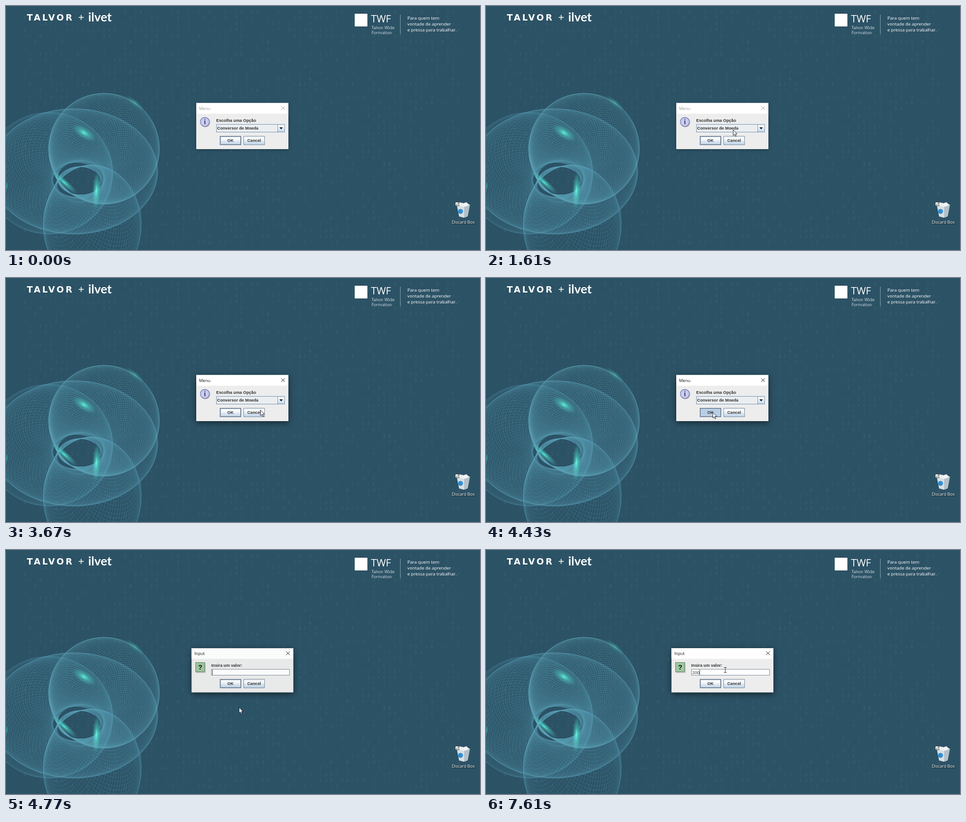
These frames come from a looping animation (1044x537 px, 8000 ms). An HTML page with a canvas:

```html
<!DOCTYPE html>
<html lang="pt">
<head>
<meta charset="utf-8">
<title>Conversor</title>
<style>
html, body { margin: 0; width: 100%; height: 100%; overflow: hidden; background: #2c5265; }
canvas { display: block; }
</style>
</head>
<body>
<canvas id="stage" width="1044" height="537"></canvas>
<script>
const W = 1044, H = 537, LOOP = 8000, TAU = Math.PI * 2;
const SWING = 'bold 9.2px "Liberation Sans", Arial, sans-serif';
const UI = '"Open Sans", "Noto Sans", sans-serif';
const stage = document.getElementById('stage').getContext('2d');

function layer() {
  const c = document.createElement('canvas');
  c.width = W;
  c.height = H;
  return c.getContext('2d');
}

function text(g, s, x, y, font, color, align = 'left') {
  g.font = font;
  g.fillStyle = color;
  g.textAlign = align;
  g.fillText(s, x, y);
}

function box(g, x, y, w, h, fill, line) {
  g.fillStyle = fill;
  g.fillRect(x, y, w, h);
  if (!line) return;
  g.strokeStyle = line;
  g.lineWidth = 1;
  g.strokeRect(x + .5, y + .5, w - 1, h - 1);
}

function poly(g, points, fill, line, width = 1) {
  g.beginPath();
  points.forEach(([x, y]) => g.lineTo(x, y));
  if (fill) { g.closePath(); g.fillStyle = fill; g.fill(); }
  if (line) { g.strokeStyle = line; g.lineWidth = width; g.stroke(); }
}

function disc(g, x, y, r, fill) {
  g.beginPath();
  g.arc(x, y, r, 0, TAU);
  g.fillStyle = fill;
  g.fill();
}

// ---- desktop, drawn once ----

function digits(g) {
  let seed = 71;
  const rnd = () => (seed = (seed * 16807) % 2147483647) / 2147483647;
  for (let row = 0; row < 39; row++) {
    for (let col = 0; col < 83; col++) {
      const shade = .06 + .14 * rnd(), n = Math.floor(rnd() * 9) + 1;
      if (rnd() < .46)
        text(g, n, 41 + col * 11.65, 16.5 + row * 13.37, '10px ' + UI, `rgba(125,175,190,${shade})`, 'center');
    }
  }
}

// A band of closed lines that wind between an outer ellipse and the central hole.
function ribbon(g, outer, lines, alpha) {
  const hole = [160, 384, 45, 30], steps = 200;
  g.strokeStyle = `rgba(92,160,181,${alpha})`;
  g.lineWidth = .7;
  for (let k = 0; k < lines; k++) {
    g.beginPath();
    for (let i = 0; i <= steps; i++) {
      const t = i / steps * TAU;
      const s = .46 * (1 - Math.cos(k / lines * TAU + t));
      const [cx, cy, rx, ry] = outer.map((v, j) => v + (hole[j] - v) * s);
      g.lineTo(cx + rx * Math.cos(t), cy + ry * Math.sin(t));
    }
    g.stroke();
  }
}

function knot(g) {
  ribbon(g, [150, 364, 184, 138], 80, .42);
  ribbon(g, [216, 314, 122, 122], 80, .5);
  ribbon(g, [190, 482, 108, 132], 50, .42);
  ribbon(g, [95, 368, 140, 134], 50, .34);
}

function glow(g, x, y, rx, ry, angle, alpha) {
  g.save();
  g.translate(x, y);
  g.rotate(angle);
  g.scale(rx, ry);
  const grad = g.createRadialGradient(0, 0, 0, 0, 0, 1);
  grad.addColorStop(0, `rgba(100,255,228,${alpha})`);
  grad.addColorStop(.4, `rgba(80,230,210,${alpha * .5})`);
  grad.addColorStop(1, 'rgba(80,220,205,0)');
  disc(g, 0, 0, 1, grad);
  g.restore();
}

function bin(g) {
  poly(g, [[993, 438], [1022, 437], [1017, 463], [1009, 466], [998, 463]], '#b4c0c8');
  poly(g, [[993, 438], [1009, 442], [1009, 466], [998, 463]], '#d8e0e5');
  poly(g, [[994, 438], [999, 432], [1007, 434], [1014, 432], [1021, 438], [1009, 442]], '#f2f5f6');
  poly(g, [[999, 432], [1004, 438], [1014, 432]], null, '#b9c5cc', .7);
  disc(g, 1001, 452, 5.5, '#2f8fd6');
  box(g, 989, 431, 9, 9, '#fff', '#333');
  poly(g, [[991, 435.5], [993, 437.5], [996.5, 433]], null, '#222');
  g.save();
  g.shadowColor = '#000';
  g.shadowBlur = 2;
  g.shadowOffsetX = g.shadowOffsetY = 1;
  text(g, 'Discard Box', 1007, 479, '9.2px ' + UI, '#fff', 'center');
  g.restore();
}

function makeDesktop() {
  const g = layer();
  box(g, 0, 0, W, H, '#2c5265');
  digits(g);
  knot(g);
  glow(g, 172, 279, 30, 13, .55, .9);
  glow(g, 199, 406, 9, 42, .06, 1);
  glow(g, 128, 388, 38, 8, .72, .9);
  glow(g, 284, 213, 26, 7, .65, .4);
  glow(g, 0, 396, 5, 12, 0, .5);

  g.letterSpacing = '3.8px';
  text(g, 'TALVOR', 46, 32, 'bold 19px "DejaVu Sans", sans-serif', '#fff');
  g.letterSpacing = '0px';
  box(g, 160, 24.2, 11, 1.6, '#fff');
  box(g, 164.7, 19.5, 1.6, 11, '#fff');
  text(g, 'ilvet', 181, 34, 'bold 27px Lato, sans-serif', '#fff');

  box(g, 768, 17, 28, 28, '#fff');
  text(g, 'TWF', 804, 36, '22px ' + UI, '#fff');
  text(g, 'Talvor Wide', 805, 51, '9.4px ' + UI, '#d5e0e4');
  text(g, 'Formation', 805, 62, '9.4px ' + UI, '#d5e0e4');
  box(g, 868, 19, 1, 43, '#8fa7b1');
  ['Para quem tem', 'vontade de aprender', 'e pressa para trabalhar.'].forEach((s, i) =>
    text(g, s, 884, 30.3 + i * 12.8, '9.8px ' + UI, '#fff'));
  bin(g);
  return g.canvas;
}

// ---- dialogs ----

function metal(g, y, h) {
  const grad = g.createLinearGradient(0, y, 0, y + h);
  [[0, '#dde8f3'], [.3, '#fff'], [.6, '#dde8f3'], [1, '#b8cfe5']].forEach(s => grad.addColorStop(...s));
  return grad;
}

function button(g, label, x, y, main, pressed) {
  box(g, x, y, 47, 20, pressed ? '#b8cfe5' : metal(g, y, 20), main ? '#5f7186' : '#7a8a99');
  if (main) {
    g.strokeStyle = '#8a9db3';
    g.strokeRect(x + 1.5, y + 1.5, 44, 17);
  }
  text(g, label, x + 23.5, y + 13.3, SWING, '#333', 'center');
}

function frame(g, title, x, y, w, h, active) {
  g.save();
  g.shadowColor = active ? 'rgba(0,0,0,.55)' : 'rgba(0,0,0,.35)';
  g.shadowBlur = active ? 12 : 6;
  g.shadowOffsetY = active ? 3 : 1;
  box(g, x, y, w, h, '#ededed');
  g.restore();
  box(g, x, y, w, 23.5, '#fff');
  const ink = active ? '#111' : '#999', cx = x + w - 11.8, cy = y + 11.3;
  text(g, title, x + 6.3, y + 15, '9.2px ' + UI, ink);
  for (const s of [1, -1]) poly(g, [[cx - 4, cy - 4 * s], [cx + 4, cy + 4 * s]], null, ink);
}

function drawMenu(g, t, cursorY) {
  frame(g, 'Menu', 419, 213.5, 203, 101.5, t >= 2090);
  disc(g, 439.5, 256.5, 10.5, 'rgba(0,0,0,.2)');
  disc(g, 438, 255, 10.5, '#66699c');
  disc(g, 438, 255, 9.3, '#c9cdf6');
  text(g, 'i', 438, 260, 'bold 16px "Liberation Serif", serif', '#4a4a60', 'center');
  text(g, 'Escolha uma Opção', 463, 254.5, SWING, '#333');

  box(g, 463, 260, 151, 18, '#ebeef0', '#7390b0');
  box(g, 598, 260, 16, 18, metal(g, 260, 18), '#7390b0');
  poly(g, [[602, 267], [610, 267], [606, 271.5]], '#222');
  text(g, 'Conversor de Moeda', 465, 272.2, SWING, '#333');

  button(g, 'OK', 471, 286, true, t >= 4360);
  button(g, 'Cancel', 523, 286);

  if (t >= 2160 && t < 3600) {
    box(g, 463, 278.5, 151, 29.5, '#eee');
    box(g, 464, cursorY < 292 ? 279.5 : 293.5, 149, 14, '#a3b8cc');
    g.strokeStyle = '#222';
    g.lineWidth = 1;
    g.strokeRect(463.5, 279, 150, 28.5);
    text(g, 'Conversor de Moeda', 464.5, 290.2, SWING, '#333');
    text(g, 'Conversor de temperatura', 464.5, 304, SWING, '#333');
  }
}

function drawInput(g, t) {
  frame(g, 'Input', 408.5, 216, 224.5, 97.5, true);
  box(g, 418.5, 248.5, 21, 22, 'rgba(0,0,0,.18)');
  box(g, 417, 247, 21, 21.5, '#9fc79f', '#5d805d');
  text(g, '?', 427.5, 262.5, 'bold 15px "Liberation Sans", Arial, sans-serif', '#111', 'center');
  text(g, 'Insira um valor:', 452, 257, SWING, '#333');
  box(g, 452, 262, 173, 14, '#fff', '#7a8a99');

  const typed = [7150, 7410, 7610].filter(at => t >= at).length;
  text(g, '200'.slice(0, typed), 454.3, 272.8, '9.6px "Liberation Sans", Arial, sans-serif', '#333');
  const caret = typed || Math.floor((t - 4500) / 530) % 2 === 0;
  if (caret) box(g, 454 + typed * 5.4, 263.5, 1, 11.5, '#333');

  button(g, 'OK', 471, 284, true);
  button(g, 'Cancel', 523, 284);
}

// ---- pointer ----

const path = [
  [160, 926, 448], [500, 640, 350], [920, 514, 299], [1200, 503, 297], [1400, 520, 285],
  [1600, 544, 272], [1625, 546, 271], [1750, 588, 270], [1890, 606, 270], [2300, 606, 270],
  [2600, 590, 301], [2840, 574, 293], [3200, 568, 289], [3600, 568, 289], [4160, 499, 294],
  [4500, 499, 295], [4565, 499, 297], [4765, 513, 347], [5120, 520, 330], [5680, 527, 264]
];

function pointerAt(t) {
  const step = 68.7;
  t = 160 + Math.floor((t - 160) / step) * step;
  const i = path.findIndex(p => p[0] > t);
  if (i < 0) return path[path.length - 1].slice(1);
  if (i === 0) return path[0].slice(1);
  const a = path[i - 1], b = path[i], f = (t - a[0]) / (b[0] - a[0]);
  return [a[1] + (b[1] - a[1]) * f, a[2] + (b[2] - a[2]) * f];
}

function drawPointer(g, x, y, beam) {
  g.save();
  g.translate(Math.round(x), Math.round(y));
  if (beam) {
    box(g, -.5, -6, 1, 12, '#333');
    box(g, -3, -6, 6, 1, '#333');
    box(g, -3, 5, 6, 1, '#333');
  } else {
    g.lineJoin = 'round';
    poly(g, [[.5, .5], [.5, 13], [3.3, 10.4], [5.3, 15], [7.2, 14.2], [5.3, 9.8], [9, 9.5], [.5, .5]], '#fff', '#111', .9);
  }
  g.restore();
}

// ---- animation ----

const desktop = makeDesktop(), sheet = layer();

function show(draw, alpha, scale) {
  sheet.clearRect(0, 0, W, H);
  draw(sheet);
  stage.save();
  stage.globalAlpha = alpha;
  stage.translate(520.5, 264.5);
  stage.scale(scale, scale);
  stage.drawImage(sheet.canvas, -520.5, -264.5);
  stage.restore();
}

function render(t) {
  const [x, y] = pointerAt(t);
  stage.drawImage(desktop, 0, 0);

  const closing = Math.max(0, (t - 4480) / 150);
  const opening = Math.min(1, (t - 4500) / 300);
  if (closing < 1) show(g => drawMenu(g, t, y), (1 - closing) ** 2, 1 - .058 * closing);
  if (opening > 0) {
    const ease = 1 - (1 - opening) ** 1.6;
    show(g => drawInput(g, t), ease, .945 + .055 * ease);
  }
  if (t >= 160) drawPointer(stage, x, y, t > 5120 && y < 278);
}

const start = performance.now();
function tick() {
  render((performance.now() - start) % LOOP);
  requestAnimationFrame(tick);
}
tick();
</script>
</body>
</html>
```
